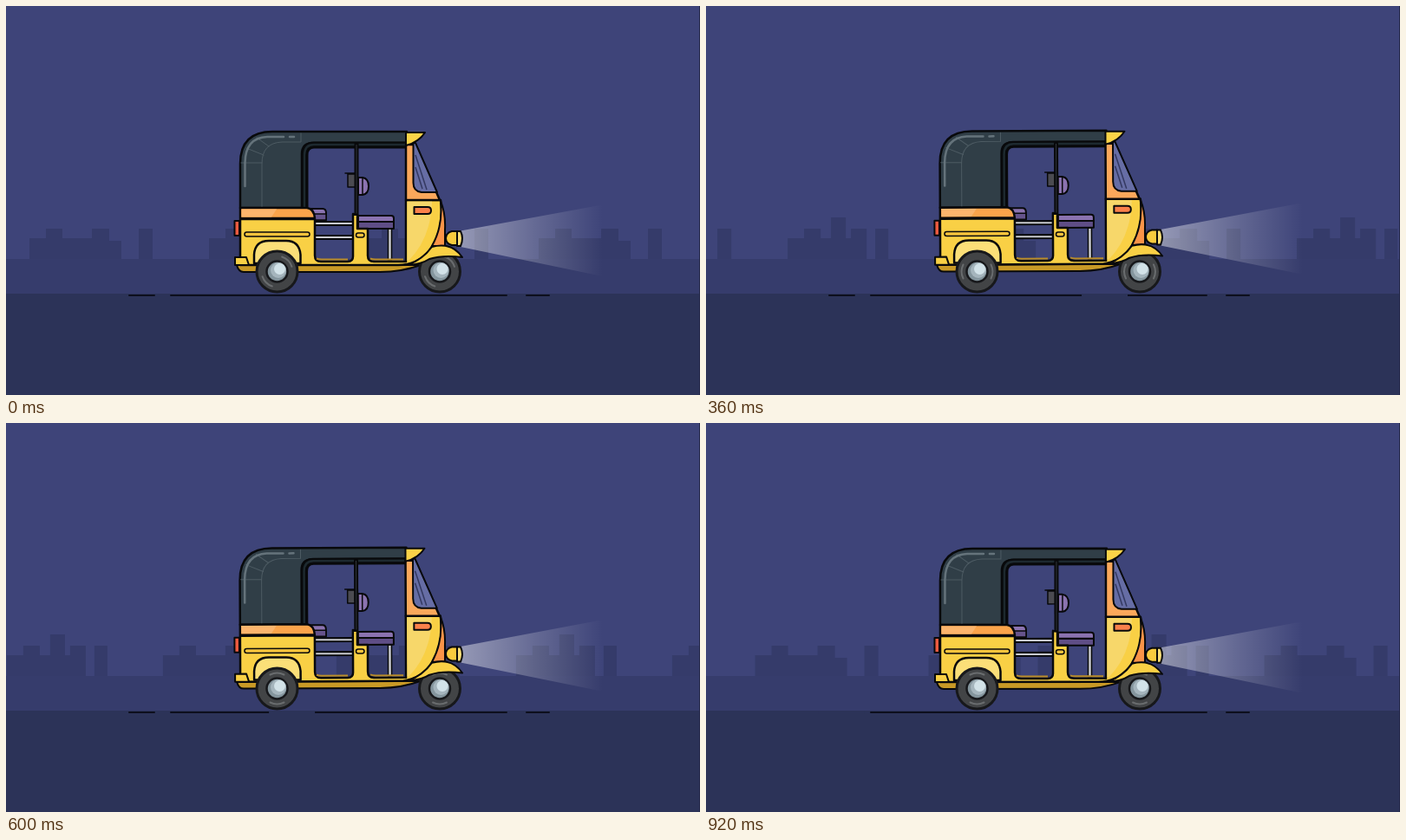
Write an HTML page that moves like this. It is 800 px wide and 449 px high and loops after 960 ms.

```html
<!DOCTYPE html>
<html lang="en">
<head>
<meta charset="utf-8">
<title>Night rickshaw</title>
<style>
  html, body { margin: 0; height: 100%; overflow: hidden; background: #3e4479; }
  svg { display: block; width: 100%; height: 100%; }
  .ink { stroke: #08090b; stroke-linejoin: round; stroke-linecap: round; }
  .line { fill: none; }
</style>
</head>
<body>
<svg viewBox="0 0 800 449" stroke-width="2.5">
  <defs>
    <linearGradient id="glow" gradientUnits="userSpaceOnUse" x1="524" y1="0" x2="688" y2="0">
      <stop offset="0" stop-color="#fff" stop-opacity=".45"/>
      <stop offset=".55" stop-color="#fff" stop-opacity=".19"/>
      <stop offset="1" stop-color="#fff" stop-opacity="0"/>
    </linearGradient>
    <path id="blockA" d="M0 292V268H19V257H38V268H72V257H92V271H106V292ZM126 292V257H142V292Z"/>
    <path id="blockB" d="M0 292V268H19V257H38V268H50V244H67V268H73V257H91V292ZM101 292V257H116V292Z"/>
    <g id="town">
      <use href="#blockA" x="27"/>
      <use href="#blockB" x="234"/>
      <use href="#blockA" x="414"/>
    </g>
    <g id="tyre">
      <circle r="23.5" fill="#424446" stroke="#17181b" stroke-width="3"/>
      <g class="spin line" stroke="#696c6e" stroke-width="2" stroke-linecap="round">
        <path d="M-8-16A18 18 0 0 1 8-16M-8 16A18 18 0 0 0 8 16"/>
      </g>
      <circle r="12" fill="#84959d" stroke="#17181b"/>
      <circle cx="1.5" cy="-1.5" r="9" fill="#a5b5bd"/>
      <circle cx="3" cy="-3" r="6.5" fill="#d2e2e8"/>
    </g>
  </defs>

  <rect width="800" height="449" fill="#3e4479"/>
  <g id="skyline" fill="#353b6a">
    <use href="#town"/>
    <use href="#town" x="587"/>
  </g>
  <rect y="292" width="800" height="41" fill="#363c6c"/>
  <rect y="332" width="800" height="117" fill="#2c3358"/>
  <path d="M142 334H171M190 334H577M600 334H626" stroke="#0d0f1d" stroke-width="2" stroke-linecap="round"/>
  <g id="gap">
    <rect y="332" width="53" height="4" fill="#2c3358"/>
  </g>
  <rect x="799" width="1" height="449" fill="#25294a"/>

  <g class="body">
    <path d="M524 259.500L690 229V312.500L524 278Z" fill="url(#glow)"/>

    <!-- cabin interior -->
    <g class="ink" stroke-width="2">
      <path d="M347 234H365Q369 234 369 239V247H347Z" fill="#8b73b0"/>
      <path d="M347 240H369V247H347Z" fill="#66548c" stroke-width="1.5"/>
      <path d="M356 249H401V253H356ZM356 265H401V269H356Z" fill="#c9cbcf"/>
      <path d="M440.500 257H444.500V293H440.500Z" fill="#c9cbcf" stroke-width="1.500"/>
      <path d="M394 194H403V209H394ZM391 193H403" fill="#4b4b51" stroke-width="1.500"/>
      <path d="M406 198H411Q418 199 418 208T411 218H406Z" fill="#8b73b0"/>
      <path d="M411 199V217" stroke-width="1.500"/>
      <path d="M406 249H447V257H406Z" fill="#5f4e86"/>
      <path d="M406 242H444Q447 242 447 245V249H406Z" fill="#8b73b0"/>
    </g>

    <!-- canopy -->
    <path class="ink" d="M270 233V182Q270 145 307 145H462V158H354Q341 158 341 171V233Z" fill="#303e47"/>
    <path class="line" d="M344.500 233V172Q344.500 160.500 355 160.500H462" stroke="#08090b" stroke-width="8"/>
    <path class="line" d="M344 233V172Q344 160 355 160H462" stroke="#1d292f"/>
    <g class="line" stroke-linecap="round">
      <path d="M295 232V182Q295 158 318 157H340V147M271 181H295M277 164L297 172M289 152L303 162" stroke="#4d5b63" stroke-width="1"/>
      <path d="M275.500 208V181Q276 152 301 151H320M327 151H332" stroke="#65737b"/>
    </g>
    <path d="M404 158V241" stroke="#08090b" stroke-width="5"/>
    <path d="M404 160V240" stroke="#30353b" stroke-width="1"/>

    <!-- sill and main shell -->
    <path class="ink" d="M266 299H478Q456 307 431 307H274Q268 307 266 299Z" fill="#c99a26" stroke-width="2"/>
    <path class="ink" d="M270 246H356V288Q356 295 363 295H394Q400 295 400 289V240L405 241V257H417V288Q417 295 424 295H461V224H501Q506 258 488 282Q474 299 452 299H270Z" fill="#f9d045"/>
    <path class="line" d="M358 291.500Q360 292.500 364 292.500H394M420 291.500Q422 292.500 426 292.500H458" stroke="#b98c28" stroke-width="2"/>
    <path d="M462.500 225.500H491Q490 268 464 294H462.500Z" fill="#f7d76a"/>
    <path class="ink" d="M270 233H347Q355 234 356 245H270Z" fill="#fba44b"/>
    <path d="M271.500 234.500H312L306 243.500H271.500Z" fill="#fcb56d"/>
    <g class="ink" fill="#f5c33c" stroke-width="1.500">
      <rect x="275" y="261" width="75" height="5" rx="2.500"/>
      <rect x="403.500" y="262" width="9.500" height="5" rx="2.500"/>
    </g>
    <rect class="ink" x="263.500" y="248" width="5.500" height="17" fill="#ee5b40" stroke-width="2"/>
    <path class="ink" d="M264 290H277L280 299H264Z" fill="#f9d045" stroke-width="2"/>
    <path class="ink" d="M286 297V287Q287 271 303 271H323Q338 271 339.500 287V297Z" fill="#fbdf78"/>

    <!-- nose and windscreen -->
    <path class="ink" d="M501 225Q507 240 506 258V277H491Q504 254 501 225Z" fill="#fa9448" stroke-width="2"/>
    <path class="ink" d="M461 160H472L500 224H461Z" fill="#fba85b"/>
    <path class="ink" d="M469.500 158H472L497 215H479Q469.500 214 469.500 204Z" fill="#666da5" stroke-width="2"/>
    <path class="line" d="M472 172L485 212M472 186L480 211" stroke="#343961" stroke-width="1.500"/>
    <path class="ink" d="M461 146H483Q476 157 461 161Z" fill="#fbd348" stroke-width="2"/>
    <path class="ink" d="M470.500 232H486Q490 232 490 236T486 240H470.500Z" fill="#fa814b" stroke-width="2"/>
  </g>

  <use href="#tyre" x="312.500" y="306.500"/>
  <use href="#tyre" x="500" y="306.500"/>

  <g class="body">
    <path class="ink" d="M463 299Q480 293 491 278Q514 272 526 290Q504 287 488 292Q479 298 463 299Z" fill="#f9d045" stroke-width="2"/>
    <g class="ink" stroke-width="2">
      <path d="M520 260H514Q507 262 507 268T514 276H520Z" fill="#f9cb3e"/>
      <path d="M520 260H524Q528 268 524 277H520Z" fill="#fbdf78"/>
    </g>
  </g>
</svg>
<script>
  const LOOP = 960, STEP = 40;
  const move = (selector, transform) =>
    document.querySelectorAll(selector).forEach(el => el.setAttribute('transform', transform));

  function draw() {
    const t = Math.floor(performance.now() % LOOP / STEP) * STEP;
    const lift = (1 - Math.cos(t / 480 * 2 * Math.PI)) / 2;
    move('#skyline', `translate(${-0.3885 * t})`);
    move('#gap', `translate(${628 - 0.5415 * t})`);
    move('.spin', `rotate(${(t - 120) / 320 * 360})`);
    move('.body', `translate(0 ${-lift}) rotate(${-0.5 * lift} 300 270)`);
    requestAnimationFrame(draw);
  }
  draw();
</script>
</body>
</html>
```
